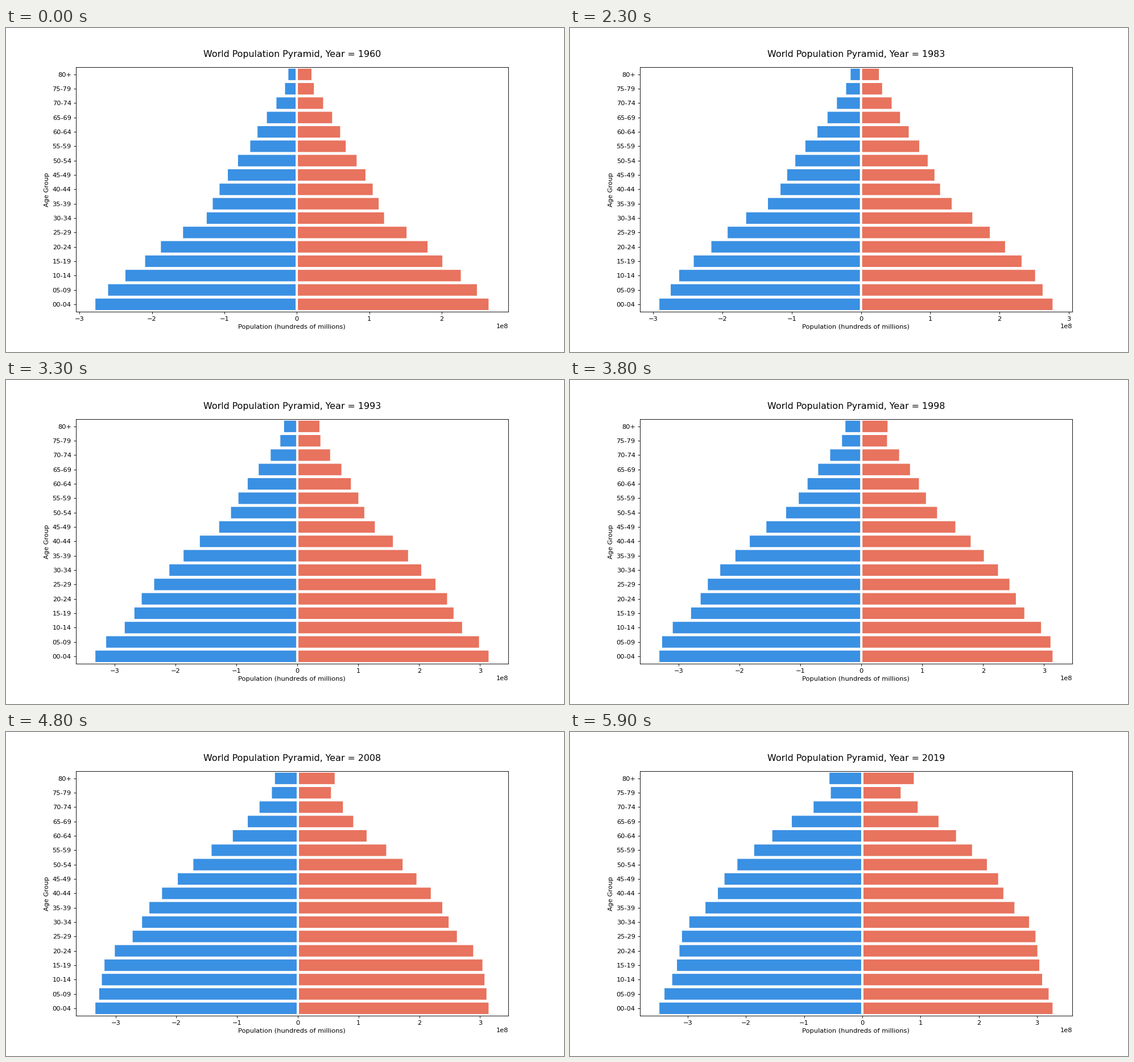
Write a matplotlib script that moves like this. It is 981 by 571 pixels and loops after 6000 ms.

```python
import numpy as np
import matplotlib.pyplot as plt
from matplotlib.animation import FuncAnimation

DPI = 81.75
FIRST, LAST = 1960, 2019
START = 1976             # the bars stand still before this year
GROUPS = 17
BLUE, RED = "#3a90e3", "#e8735e"

# Millions of boys aged 0-4, every five years from 1901.
BOYS = [46, 57, 67, 76, 82, 97.5, 110, 120, 128, 135, 168, 198, 218,
        243, 264, 278, 279, 309, 331.4, 331, 325, 329, 339.5, 347.5, 349]
BOY_YEARS = 1901 + 5 * np.arange(len(BOYS))

years = np.maximum(np.arange(FIRST, LAST + 1), START)[:, None]
groups = np.arange(GROUPS)[None, :]
cohort = years - 5 * groups      # the year in which a group was aged 0-4
passed = years - START


def survival():
    """Slow losses when young, steep ones in old age that ease with time."""
    easing = 1 - 0.18 * (passed / 43) ** 3
    return np.exp(-0.0135 * groups - 0.52 * easing * (groups / 14) ** 7)


def women_per_man():
    """Fewer girls are born, but women live longer."""
    born = 0.9525 - 0.00035 * np.maximum(cohort - START, 0)
    gap = 0.47 - 0.0057 * passed
    return born + 0.0025 * groups + gap * (groups / 15) ** 6


def pyramid(people, oldest, growth):
    """Fill the open-ended top group; a bar never shrinks."""
    people[:, -1:] = oldest * np.exp(growth * passed)
    return np.maximum.accumulate(people, axis=0) * 1e6


men = np.interp(cohort, BOY_YEARS, BOYS) * survival()
female = pyramid(men * women_per_man(), 20.3, 0.0342)
male = pyramid(men, 11.6, 0.0368)

fig, ax = plt.subplots(figsize=(981 / DPI, (571 + 1e-6) / DPI), dpi=DPI)
fig.subplots_adjust(left=0.125, right=0.9, bottom=0.125, top=0.879)

rows = np.arange(GROUPS)
left = ax.barh(rows, -male[0], height=0.8, color=BLUE, snap=False)
right = ax.barh(rows, female[0], height=0.8, color=RED, snap=False)
ax.axvline(0, color="white", lw=3.5, snap=False)

labels = [f"{5 * i:02d}-{5 * i + 4:02d}" for i in range(GROUPS - 1)] + ["80+"]
ax.set_yticks(rows, labels)
ax.set_ylim(-0.5, GROUPS - 0.5)
ax.set_xlabel("Population (hundreds of millions)")
ax.set_ylabel("Age Group")
title = ax.set_title("", fontsize=14, pad=15.5)


def update(i):
    for bar, value in zip(left, male[i]):
        bar.set_width(-value)
    for bar, value in zip(right, female[i]):
        bar.set_width(value)
    low, high = male[i].max(), female[i].max()
    margin = 0.05 * (low + high)
    ax.set_xlim(-low - margin, high + margin)
    title.set_text(f"World Population Pyramid, Year = {FIRST + i}")
    return [*left, *right, title]


anim = FuncAnimation(fig, update, frames=LAST - FIRST + 1, interval=100,
                     repeat=True, repeat_delay=0, blit=False)
plt.show()
```
